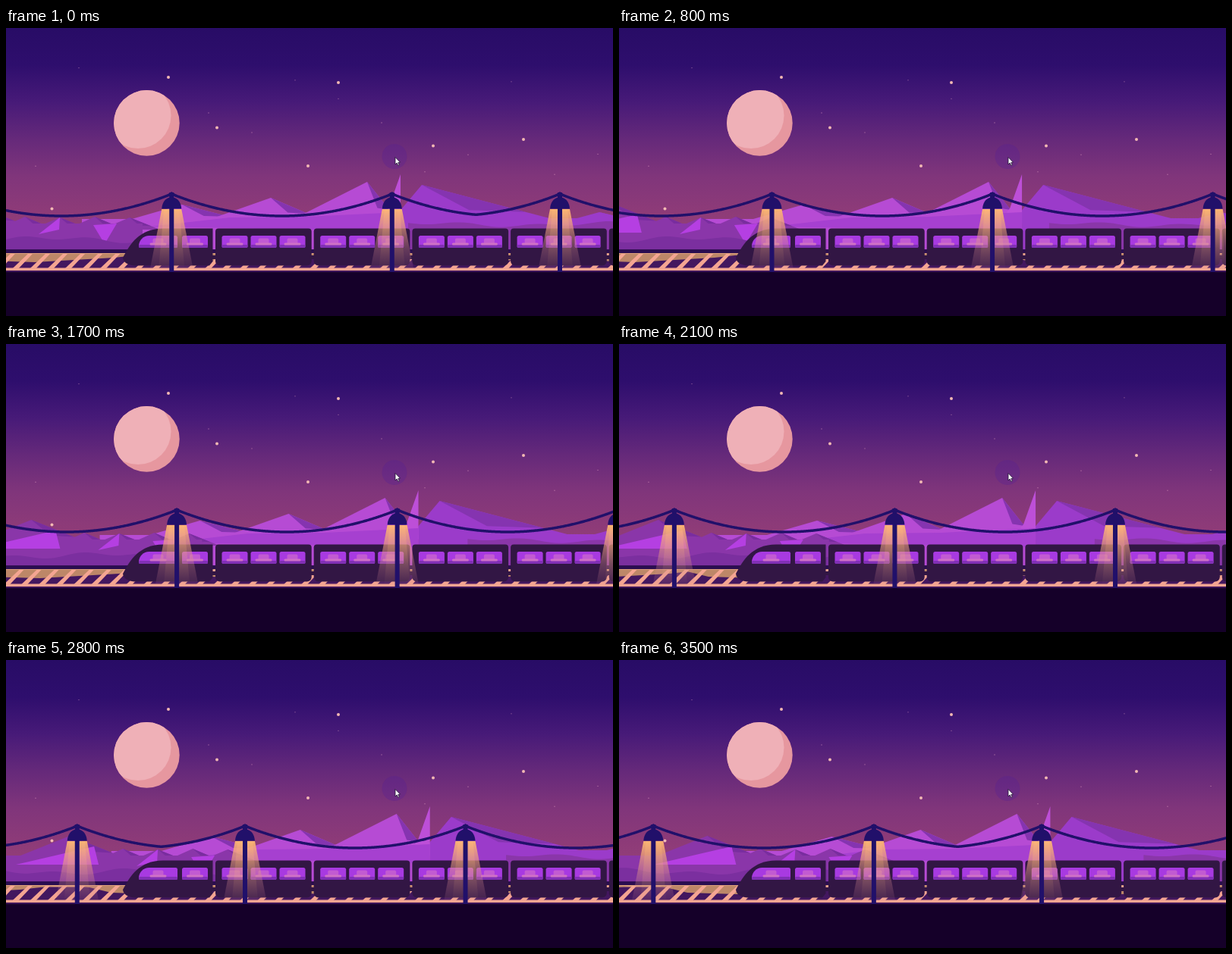
These frames come from a looping animation (800 px wide and 380 px high, 3.6 s). An HTML page with a canvas:

```html
<!DOCTYPE html>
<html lang="en">
<head>
<meta charset="utf-8">
<title>Night train</title>
<style>
  html, body { margin: 0; width: 100%; height: 100%; overflow: hidden; background: #150029; }
  canvas { display: block; width: 800px; height: 380px; }
</style>
</head>
<body>
<canvas id="stage" width="800" height="380"></canvas>
<script>
const ctx = document.getElementById('stage').getContext('2d');
const LOOP = 3600, STEP = 100;
const GAP = 290.55, SHORT_GAP = 221.2;      // distance between poles, and across the seam
const TILE = 4 * GAP + SHORT_GAP;           // width of the repeating scenery
const TIE = TILE / 60, CAR = 129.7, HORIZON = 292;
const NAVY = '#21106a', BODY = '#321644', PINK = '#f4a592';
const WINDOW = '#a83ae1', SILL = '#8130b5';

function poly(color, ...points) {
  ctx.fillStyle = color;
  ctx.beginPath();
  points.forEach(([x, y]) => ctx.lineTo(x, y));
  ctx.fill();
}

function rect(color, x, y, w, h, r = 0) {
  ctx.fillStyle = color;
  ctx.beginPath();
  ctx.roundRect(x, y, w, h, r);
  ctx.fill();
}

function disc(color, x, y, r) {
  ctx.fillStyle = color;
  ctx.beginPath();
  ctx.arc(x, y, r, 0, Math.PI * 2);
  ctx.fill();
}

function fade(y0, y1, ...colors) {
  const g = ctx.createLinearGradient(0, y0, 0, y1);
  colors.forEach((c, i) => g.addColorStop(i / (colors.length - 1), c));
  return g;
}

function shifted(dx, draw) {
  ctx.save();
  ctx.translate(dx, 0);
  draw();
  ctx.restore();
}

function random(seed) {
  const s = Math.sin(seed * 12.9898) * 43758.5453;
  return s - Math.floor(s);
}

const sky = fade(0, HORIZON, '#280c66', '#2e0e6d', '#471a78', '#65297a', '#80357b', '#8e3b78', '#96437a');
const beam = fade(239, 316, 'rgba(255,184,112,.95)', 'rgba(238,160,125,.62)',
  'rgba(215,140,140,.32)', 'rgba(200,125,150,.12)');
const core = fade(239, 316, 'rgba(255,190,120,.3)', 'rgba(255,190,120,.02)');

const stars = [[214, 65], [438, 72], [278, 131.5], [398, 182], [563, 155.5], [682, 147], [60.5, 238.5]];

function drawSky() {
  rect(sky, 0, 0, 800, HORIZON);
  stars.forEach(([x, y]) => disc('#f3b9b3', x, y, 2));
  for (let i = 0; i < 14; i++) {
    disc('rgba(226,160,190,.6)', 39 + i * 57, 44 + 150 * random(i + 1), .7);
  }
  disc('#e6979f', 185.4, 125.4, 43.3);
  ctx.save();
  ctx.clip();
  disc('#efb0b7', 174, 115.5, 43.5);
  ctx.restore();
}

// A triangular mountain with a shaded facet on its right slope
function peak(x, top, left, right, base, lit, shade) {
  const h = base - top;
  poly(lit, [x - left, base], [x, top], [x + right, base]);
  poly(shade, [x, top], [x + right * .7, top + h * .7], [x + right * .32, top + h * .65]);
}

function hills(color, x0, x1, y, height, length) {
  ctx.fillStyle = color;
  ctx.beginPath();
  ctx.moveTo(x0, HORIZON);
  for (let x = x0; x <= x1; x += 5) {
    ctx.lineTo(x, y - height * Math.sin(x / length) * Math.cos(x / length / 2.3));
  }
  ctx.lineTo(x1, HORIZON);
  ctx.fill();
}

// x = 0 is the seam of the far range
function drawFarRange() {
  const violet = '#9b3bca', magenta = '#b64bd4', dark = '#8534b0';
  peak(262, 243, 70, 80, 262, violet, violet);
  peak(28, 207, 43, 195, 258, violet, dark);
  rect(violet, 0, 251, 300, 41);
  peak(-288, 233, 80, 90, 256, magenta, dark);
  peak(-171, 224, 85, 70, 254, magenta, dark);
  peak(-44, 203, 105, 42, 256, magenta, dark);
  poly('#bd4fd8', [-20, 243], [-16, 238], [0, 193], [0, 258]);
  rect(magenta, -420, 252, 420, 40);
  poly('#a640d0', [-330, 262], [-225, 250], [-125, 249], [0, 243], [0, 268]);
}

function drawNearRange() {
  const base = '#8a36a9', dark = '#792d9f', bright = '#b53fe2';
  peak(-45, 232, 80, 80, 264, base, dark);
  for (let i = 0; i < 4; i++) peak(25 + i * 46, 249 + i % 2, 38, 40, 266, base, dark);
  rect(base, -200, 258, 380, 34);
  hills(base, 530, 810, 259, 4, 22);
  poly(bright, [-116, 270], [-13, 246], [-7, 270]);
  poly(bright, [43, 272], [71, 250], [70, 266]);
  poly(bright, [115, 260], [146, 258], [130, 285]);
  hills('#7b2f9f', -200, 190, 279, 5, 20);
}

function drawTrack(poles, start) {
  rect('#43175f', 0, HORIZON, 800, 29);
  rect('#2a0d50', 0, 292.5, 800, 4.5);
  rect('#dd9f7c', 0, 297, 800, 2.5);
  poles.forEach(x => poly('#bd8768', [x + 8, 298], [x + 260, 298], [x + 215, 303], [x + 110, 309], [x + 45, 307]));
  for (let x = (start + 16.7) % TIE - 2 * TIE; x < 830; x += TIE) {
    poly(PINK, [x, 317], [x + 8, 317], [x + 26, 298], [x + 20, 298]);
  }
}

function drawSeat(x) {
  rect('#c25bd2', x - 7, 277.5, 14, 8, 2);
  rect('#cf72c6', x - 11, 283.5, 22, 3, 1.5);
}

function drawWindow(x, w = 34, corner = 2.5) {
  rect(WINDOW, x, 274, w, 16, [corner, 2.5, 2.5, 2.5]);
  rect(SILL, x, 286, w, 4, 1.5);
  drawSeat(x + w / 2);
}

function drawTrain() {
  ctx.fillStyle = BODY;
  ctx.beginPath();
  ctx.moveTo(154, 303);
  ctx.bezierCurveTo(164, 284, 176, 265, 207, 264.5);
  ctx.lineTo(272.5, 264.5);
  ctx.lineTo(272.5, 308);
  ctx.lineTo(268, 313.5);
  ctx.lineTo(169, 313.5);
  ctx.quadraticCurveTo(155, 312, 154, 303);
  ctx.fill();
  drawWindow(175, 51, 15);
  drawWindow(232);
  for (let x = 276; x < 800; x += CAR) {
    rect(BODY, x - 5, 300, 8, 5);
    rect(BODY, x, 264.5, 126.7, 49, [4, 4, 6, 6]);
    for (let i = 0; i < 3; i++) drawWindow(x + 8.5 + i * 38);
  }
}

function drawGround() {
  rect('#150029', 0, 320, 800, 60);
  rect('#3d1459', 0, 320, 800, 2);
  rect(PINK, 0, 316.5, 800, 3.5);
}

function drawPole(x) {
  shifted(x, () => {
    poly(beam, [-13, 239], [13, 239], [28, 316], [-28, 316]);
    poly(core, [-10, 239], [10, 239], [17, 316], [-17, 316]);
    rect(NAVY, -3, 217, 6, 105);
    poly(NAVY, [-9, 222], [0, 216], [9, 222]);
    ctx.beginPath();
    ctx.moveTo(-13, 238.5);
    ctx.bezierCurveTo(-12, 218, 12, 218, 13, 238.5);
    ctx.fill();
  });
}

function drawWire(poles) {
  ctx.strokeStyle = NAVY;
  ctx.lineWidth = 3.5;
  ctx.lineJoin = 'round';
  ctx.beginPath();
  for (let x = -4; x <= 804; x++) {
    const d = Math.min(...poles.map(p => Math.abs(x - p)));
    ctx.lineTo(x, 248 - 29 * (1 - d / (GAP / 2)) ** 2);
  }
  ctx.stroke();
}

function drawCursor() {
  disc('rgba(84,32,150,.3)', 512, 169.5, 16.5);
  poly('#fff', [513, 170.5], [513, 180], [515.2, 178], [516.8, 181.5], [518.3, 180.8], [516.8, 177.5], [519.5, 177.2]);
  ctx.strokeStyle = '#1c1030';
  ctx.lineWidth = .8;
  ctx.closePath();
  ctx.stroke();
}

function polesFrom(start) {
  const list = [];
  for (let n = -2; n < 1; n++) {
    for (let i = 0; i < 5; i++) list.push(start + n * TILE + i * GAP);
  }
  return list.filter(x => x > -320 && x < 1120);
}

function draw(t) {
  // the foreground starts slightly late and catches up
  const late = 15 * Math.max(0, Math.min(t / 400, (1300 - t) / 900));
  const start = 730 + (t - late) * TILE / 4000;
  const poles = polesFrom(start);
  drawSky();
  shifted(520 + t * TILE / 1e5, drawFarRange);
  shifted(t * TILE / 3e4, drawNearRange);
  drawTrack(poles, start);
  drawTrain();
  drawGround();
  poles.forEach(drawPole);
  drawWire(poles);
  drawCursor();
}

function tick() {
  const t = (performance.now() + 8) % LOOP;
  draw(Math.floor(t / STEP) * STEP);
  requestAnimationFrame(tick);
}
tick();
</script>
</body>
</html>
```
